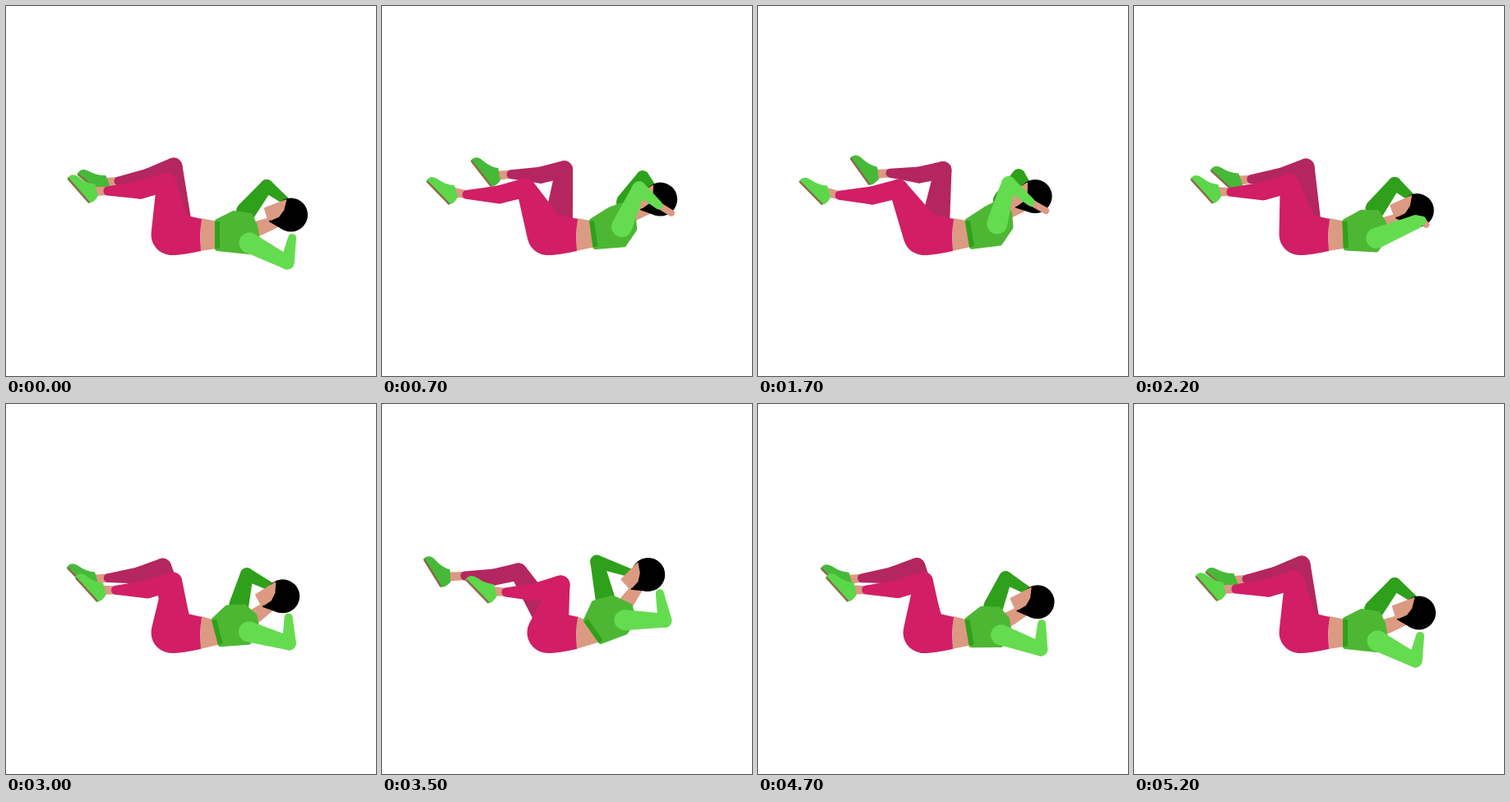
Recreate the animation shown at these times as an HTML page with a canvas. Size 450 by 450 pixels, loop 5300 ms.

```html
<!DOCTYPE html>
<html>
<head>
<meta charset="utf-8">
<title>Bicycle crunch</title>
<style>
html, body { margin: 0; width: 100%; height: 100%; overflow: hidden; background: #fff; }
canvas { display: block; width: 450px; height: 450px; }
</style>
</head>
<body>
<canvas id="stage" width="450" height="450"></canvas>
<script>
const ctx = document.getElementById('stage').getContext('2d');
const LOOP = 5300, STEP = 100;
const SKIN = '#dc9a82', PINK = '#d11e65', DARK_PINK = '#b4265f';
const GREEN = '#4db734', DARK_GREEN = '#2fa01b', LIGHT_GREEN = '#65dc50';

// Every value has three poses: rest, near leg stretched, far leg stretched.
const LEGS = {
  nearToe: [[75, 209], [42, 214], [102, 213]],
  nearCuff: [[124, 225], [91, 232], [151, 229]],
  nearKnee: [[195, 214], [163, 225], [217, 220]],
  nearTilt: [[0.85], [0.77], [0.8]],
  farToe: [[87, 204], [121, 178], [51, 188]],
  farCuff: [[137, 213], [169, 200], [101, 209]],
  farKnee: [[204, 195], [232, 201], [166, 204]],
  farHip: [[208, 260], [219, 260], [203, 262]],
  farTilt: [[0.68], [1.04], [1.02]]
};
const BODY = {
  bandTop: [[257, 262], [254, 261], [248, 263]],
  chest: [[277, 252], [277, 245], [258, 242]],
  collar: [[297, 255], [290, 234], [281, 236]],
  nape: [[303, 267], [307, 246], [302, 246]],
  back: [[306, 284], [308, 264], [306, 264]],
  lowBack: [[295, 299], [294, 285], [296, 278]],
  bandEnd: [[257, 295], [261, 292], [266, 289]],
  neck: [[308, 270], [303, 243], [298, 241]],
  head: [[346.5, 254], [334, 224], [324, 208]],
  nod: [[0], [-0.3], [-0.42]]
};
const ARMS = {
  farShoulder: [[292, 250], [300, 232], [272, 238]],
  farElbow: [[317, 219], [317, 202], [262, 192]],
  farWrist: [[339, 236], [325, 215], [303, 206]],
  nearShoulder: [[296, 288], [289, 257], [295, 263]],
  upperArm: [[0.48, 52], [-1.57, 51], [0.02, 49]],
  nearWrist: [[348, 282], [322, 232], [338, 231]],
  nearHand: [[348, 282], [346, 244], [338, 231]]
};

const ramp = (t, from, to) => {
  const f = Math.min(1, Math.max(0, (t - from) / (to - from)));
  return (1 - Math.cos(Math.PI * f)) / 2;
};
const blend = ([rest, near, far], a, b) =>
  rest.map((v, i) => v + (near[i] - v) * a + (far[i] - v) * b);
const poseOf = (parts, a, b) =>
  Object.fromEntries(Object.entries(parts).map(([k, v]) => [k, blend(v, a, b)]));
const turn = ([ox, oy], angle, [x, y]) => {
  const c = Math.cos(angle), s = Math.sin(angle);
  return [ox + x * c - y * s, oy + x * s + y * c];
};

function taper([x1, y1], r1, [x2, y2], r2, color) {
  const dx = x2 - x1, dy = y2 - y1, a = Math.atan2(dy, dx);
  const ratio = (r1 - r2) / (Math.hypot(dx, dy) || 1);
  const k = Math.acos(Math.max(-1, Math.min(1, ratio)));
  ctx.fillStyle = color;
  ctx.beginPath();
  ctx.arc(x1, y1, r1, a + k, a - k + 2 * Math.PI);
  ctx.arc(x2, y2, r2, a - k, a + k);
  ctx.fill();
}

function shape(points, color, round = 0) {
  ctx.beginPath();
  points.forEach(p => ctx.lineTo(...p));
  ctx.closePath();
  ctx.fillStyle = ctx.strokeStyle = color;
  ctx.fill();
  if (round) {
    ctx.lineWidth = round;
    ctx.lineJoin = 'round';
    ctx.stroke();
  }
}

function shoe(toe, tilt, color) {
  ctx.save();
  ctx.translate(...toe);
  ctx.rotate(tilt);
  ctx.fillStyle = color;
  ctx.beginPath();
  ctx.moveTo(0, 1);
  ctx.quadraticCurveTo(-2, -9, 9, -11);
  ctx.quadraticCurveTo(20, -13, 28, -20);
  ctx.lineTo(41, -13);
  ctx.quadraticCurveTo(44, -4, 40, 1);
  ctx.fill();
  ctx.fillStyle = '#8a6b48';
  ctx.fillRect(1, -1, 39, 2.5);
  ctx.restore();
}

function leg(hip, hipR, knee, kneeR, cuff, toe, tilt, color, shoeColor) {
  const calf = [cuff[0] * 0.45 + knee[0] * 0.55, cuff[1] * 0.45 + knee[1] * 0.55 + kneeR * 0.4];
  taper(turn(toe, tilt, [35, -15]), 5.5, cuff, 5, SKIN);
  shoe(toe, tilt, shoeColor);
  taper(cuff, 5.5, calf, kneeR - 0.5, color);
  taper(calf, kneeR - 0.5, knee, kneeR, color);
  taper(knee, kneeR, hip, hipR, color);
}

function drawHead([x, y], nod) {
  const at = points => points.map(p => turn([x, y], nod, p));
  taper([x, y], 20.5, [x, y], 20.5, '#000');
  shape(at([[-13, -4], [-27, 8], [-9, 18.5]]), '#000');
  shape(at([[-6, -18], [-32, -8], [-28, 5], [-24, 6], [-15, 2], [-9, -6]]), SKIN, 1.5);
}

function draw(t) {
  const a = ramp(t, 0, 1200) - ramp(t, 1270, 2560);
  const back = ramp(t, 3850, 5150);
  const b = 1.08 * (ramp(t, 2560, 3700) - back);
  const lift = 1.08 * (ramp(t, 2450, 3700) - back); // the upper body leads the legs
  const swing = Math.sqrt(Math.max(0, a));
  const l = poseOf(LEGS, a, b), p = poseOf(BODY, a, lift), m = poseOf(ARMS, a, lift);
  const [angle, reach] = blend(ARMS.upperArm, swing, lift);
  const elbow = turn(m.nearShoulder, angle, [reach, 0]);
  const wrist = blend(ARMS.nearWrist, swing, lift);
  const hand = blend(ARMS.nearHand, swing, lift);
  const bulge = 56 * swing * (1 - swing);
  wrist[0] += bulge;
  hand[0] += bulge * 0.6;

  ctx.fillStyle = '#fff';
  ctx.fillRect(0, 0, 450, 450);

  taper(m.farShoulder, 12, m.farElbow, 8, DARK_GREEN);
  taper(m.farElbow, 8, m.farWrist, 5, DARK_GREEN);
  leg(l.farHip, 17, l.farKnee, 10.5, l.farCuff, l.farToe, l.farTilt[0], DARK_PINK, '#47b939');

  taper(turn(p.head, p.nod[0], [-17, 8]), 7, p.neck, 9, SKIN);
  shape([[237, 258], p.bandTop, p.bandEnd, [236, 298]], SKIN);
  shape([p.bandTop, p.chest, p.collar, p.nape, p.back, p.lowBack, p.bandEnd], GREEN, 6);
  ctx.strokeStyle = DARK_GREEN;
  ctx.lineWidth = 6;
  ctx.beginPath();
  ctx.moveTo(...p.bandTop);
  ctx.lineTo(...p.bandEnd);
  ctx.stroke();

  leg([201.5, 278], 25, l.nearKnee, 11.5, l.nearCuff, l.nearToe, l.nearTilt[0], PINK, '#5cd74a');
  ctx.fillStyle = PINK;
  ctx.beginPath();
  ctx.moveTo(212, 253);
  ctx.lineTo(238, 259);
  ctx.quadraticCurveTo(235, 278, 237, 298);
  ctx.quadraticCurveTo(215, 303, 201, 303);
  ctx.fill();

  drawHead(p.head, p.nod[0]);
  taper(wrist, 4, hand, 4, SKIN);
  taper(m.nearShoulder, 12.5, elbow, 8.5, LIGHT_GREEN);
  taper(elbow, 8.5, wrist, 5, LIGHT_GREEN);
}

function tick() {
  const t = performance.now() % LOOP;
  draw(Math.floor(t / STEP) * STEP);
  requestAnimationFrame(tick);
}
tick();
</script>
</body>
</html>
```
